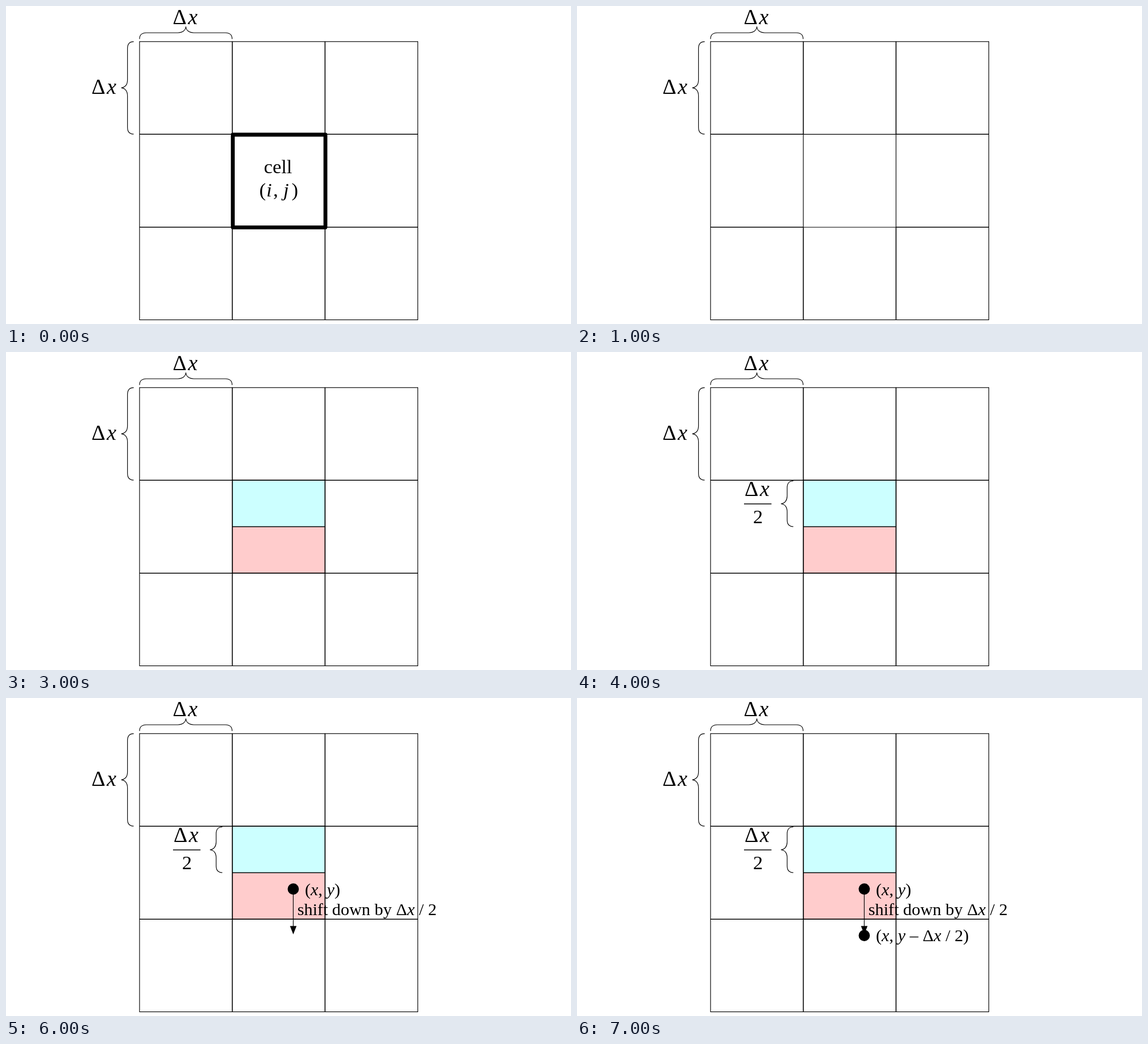
Recreate the animation shown at these times as an HTML page. Size 998 by 561 pixels, loop 8 s.

```html
<!DOCTYPE html>
<html lang="en">
<head>
<meta charset="utf-8">
<title>Cell and particle shift</title>
<style>
  html, body { margin: 0; width: 100%; height: 100%; overflow: hidden; background: #fff; }
  svg { display: block; width: 100%; height: 100%; }
  text { font-family: "Liberation Serif", "Times New Roman", serif; font-size: 30.3px; white-space: pre; }
  .tex { font-size: 34.5px; }
  .delta { font-size: 38px; }
  .i { font-style: italic; }
  .line { fill: none; stroke: #000; stroke-width: 1.15; }
</style>
</head>
<body>
<svg id="stage" viewBox="0 0 998 561"></svg>
<script>
const LOOP = 8000, STEP = 1000;
const X = [235.9, 399.7, 563.5, 727.4];
const Y = [62.8, 226.3, 390.2, 553.6];
const MID = 308.3;
const stage = document.getElementById('stage');
const layers = [];

// Adds a group that is visible from step a up to, but not including, step b.
function layer(a, b, markup) {
  const g = document.createElementNS('http://www.w3.org/2000/svg', 'g');
  g.innerHTML = markup;
  stage.append(g);
  layers.push({ g, a, b });
}

const line = (x1, y1, x2, y2, w = 1.15) =>
  `<path class="line" d="M${x1} ${y1}L${x2} ${y2}" style="stroke-width:${w}"/>`;

const box = (x, y, w, h, fill) =>
  `<rect class="line" x="${x}" y="${y}" width="${w}" height="${h}" style="fill:${fill}"/>`;

const label = (x, y, s, cls = '') => `<text class="${cls}" x="${x}" y="${y}">${s}</text>`;
const it = s => `<tspan class="i">${s}</tspan>`;
const dot = y => `<circle cx="507.4" cy="${y}" r="9.9"/>`;
const deltaX = (x, y) => label(x, y, 'Δ', 'delta') + label(x + 27, y, 'x', 'delta i');

// Curly brace of length n, opening downwards, its tip 22 units above its ends.
function brace(n, transform) {
  const m = n / 2;
  return `<path class="line" transform="${transform}" d="M0 0C0 -7 4 -11 12 -11H${m - 14}
    C${m - 6} -11 ${m - .5} -15 ${m} -22C${m + .5} -15 ${m + 6} -11 ${m + 14} -11
    H${n - 12}C${n - 4} -11 ${n} -7 ${n} 0"/>`;
}

function grid() {
  let s = box(X[0], Y[0], X[3] - X[0], Y[3] - Y[0], 'none');
  for (const k of [1, 2]) {
    s += line(X[k], Y[0], X[k], Y[1], 1.6) + line(X[k], Y[2], X[k], Y[3], 1.6);
    s += line(X[0], Y[k], X[1], Y[k], 1.6) + line(X[2], Y[k], X[3], Y[k], 1.6);
    s += line(X[1], Y[k], X[2], Y[k]) + line(X[k], Y[1], X[k], Y[2]);
  }
  return s;
}

const cellW = X[2] - X[1];
const sides = (y1, y2) => line(X[1], y1, X[1], y2, 1.6) + line(X[2], y1, X[2], y2, 1.6);

layer(0, 8, grid()
  + brace(163.5, 'translate(235.9 58.2)')
  + brace(163.2, 'translate(225.6 226) rotate(-90)')
  + deltaX(294.5, 32) + deltaX(151, 154.5));

layer(0, 1,
  '<rect x="400.6" y="227" width="163.6" height="163.6" fill="none" stroke="#000" stroke-width="6.8" stroke-linejoin="round"/>'
  + label(455.6, 295, 'cell', 'tex')
  + label(447.5, 336, '(', 'tex') + label(460, 336, 'i', 'tex i')
  + label(472, 336, ',', 'tex') + label(490, 336, 'j', 'tex i') + label(504.5, 336, ')', 'tex'));

layer(2, 8, box(X[1], MID, cellW, Y[2] - MID, '#fcc')
  + sides(MID, Y[2]) + line(X[1], Y[2], X[2], Y[2], 1.6));

layer(3, 8, box(X[1], Y[1], cellW, MID - Y[1], '#cff')
  + sides(Y[1], MID) + line(X[1], Y[1], X[2], Y[1], 1.6) + line(X[1], MID, X[2], MID, 1.3));

layer(4, 8, brace(80.5, 'translate(382.2 308) rotate(-90)')
  + deltaX(296, 254) + line(295, 268, 343.5, 268, 1.5)
  + label(311, 302, '2', 'tex'));

layer(5, 8, dot(337) + label(528, 348, `(${it('x')}, ${it('y')})`));
layer(5, 6, label(528, 379.8, 'particle position'));

layer(6, 8, line(507.4, 337, 507.4, 404)
  + '<path d="M501.6 402.3H513.2L507.4 417Z"/>'
  + label(514.7, 383, `shift down by Δ${it('x')} / 2`));

layer(7, 8, dot(419) + label(528, 429, `(${it('x')}, ${it('y')} – Δ${it('x')} / 2)`));

function draw(t) {
  const step = Math.floor((t % LOOP) / STEP);
  for (const { g, a, b } of layers) {
    g.style.display = step >= a && step < b ? '' : 'none';
  }
}

const start = performance.now();
function tick(now) {
  draw(Math.max(0, now - start));
  requestAnimationFrame(tick);
}
draw(0);
requestAnimationFrame(tick);
</script>
</body>
</html>
```
